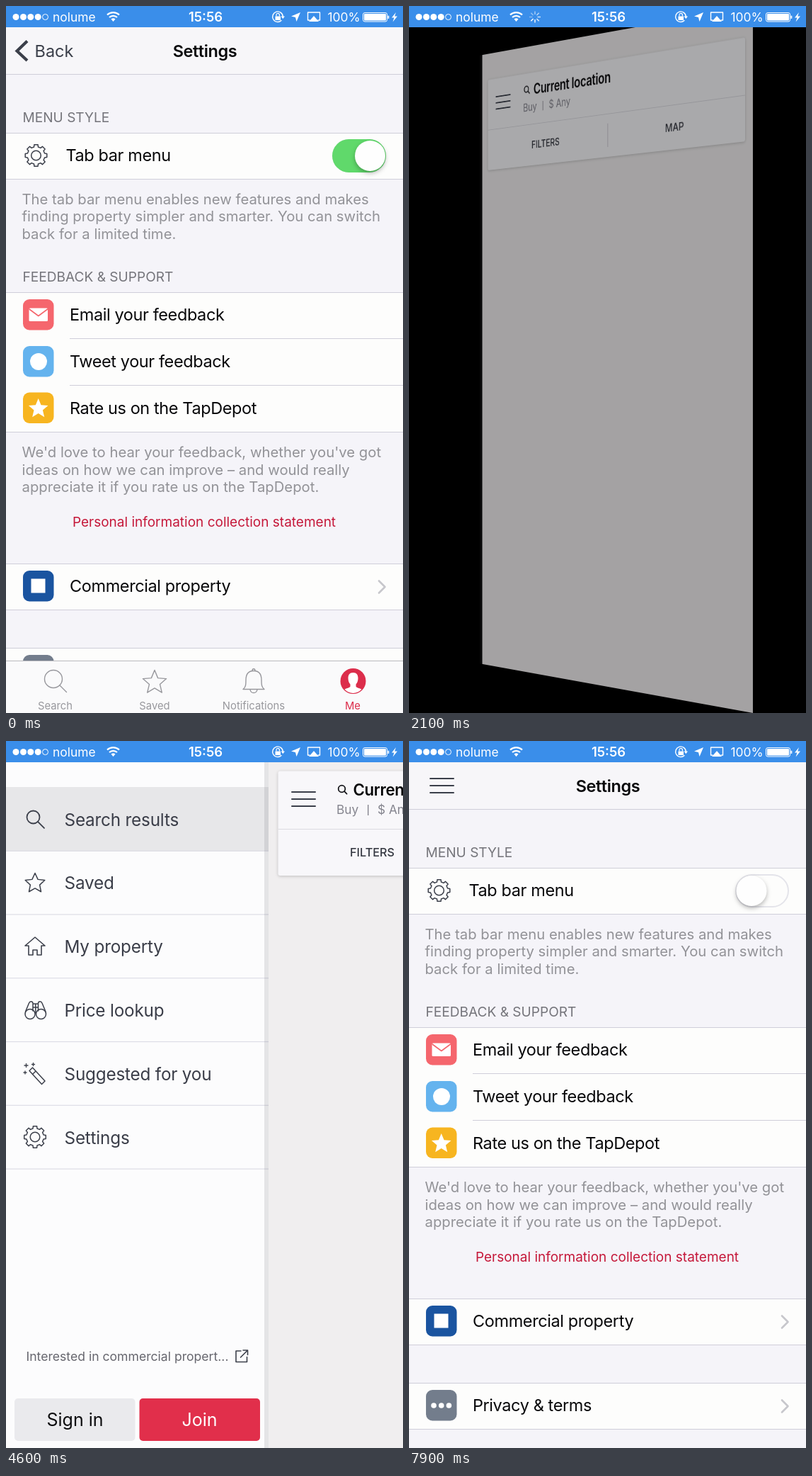
An HTML page for the animation above (8 s loop, 561x998 px).

```html
<!DOCTYPE html>
<html lang="en">
<head>
<meta charset="utf-8">
<title>Settings menu style</title>
<style>
html, body { margin: 0; width: 100%; height: 100%; overflow: hidden; background: #000; }
#stage { position: relative; width: 561px; height: 998px; overflow: hidden; background: #000;
  perspective: 2376px; perspective-origin: 280.5px 499px; }
.page, #status { position: absolute; left: 0; top: 0; width: 561px; height: 998px; }
#status { height: 30px; }
svg { display: block; overflow: visible; }
text { font-family: Inter, "Liberation Sans", sans-serif; white-space: pre; }
.title, .row { font-size: 23.5px; letter-spacing: -.4px; fill: #08080a; }
.title { font-weight: 600; text-anchor: middle; }
.back { font-size: 23.5px; fill: #3b3f4a; }
.head { font-size: 19.1px; fill: #75757b; }
.note { font-size: 20.3px; fill: #929297; }
.link { font-size: 19px; fill: #c5183a; text-anchor: middle; }
.tab { font-size: 14.8px; fill: #98989d; text-anchor: middle; }
.item { font-size: 24.3px; letter-spacing: -.2px; fill: #3a3d48; }
.place { font-size: 22.3px; letter-spacing: -.4px; font-weight: 600; fill: #08080a; }
.sub { font-size: 17.3px; fill: #85858f; }
.act { font-size: 16.2px; font-weight: 500; fill: #33363f; text-anchor: middle; }
.more { font-size: 17.6px; fill: #66666e; }
.btn { font-size: 25px; text-anchor: middle; }
.stat { font-size: 17.4px; fill: #fff; }
.time { font-size: 18.5px; font-weight: 600; fill: #fff; text-anchor: middle; }
.ln { fill: none; stroke-linejoin: round; stroke-linecap: round; }
.knob { filter: drop-shadow(0 3px 3px rgba(0,0,0,.28)); }
.card { filter: drop-shadow(0 1px 2px rgba(0,0,0,.2)); }
</style>
</head>
<body>
<div id="stage">
  <div class="page" id="menu"></div>
  <div class="page" id="tabbed"></div>
  <div class="page" id="search"></div>
  <div class="page" id="plain"></div>
  <div id="status"></div>
</div>
<script>
const W = 561, H = 998, LOOP = 8000, OPEN = 371;
const INK = '#3b3f4a', RED = '#dc2d4b', LINE = '#cfced9';
const $ = id => document.getElementById(id);

const text = (cls, x, y, s, extra = '') => `<text class="${cls}" x="${x}" y="${y}" ${extra}>${s}</text>`;
const rect = (x, y, w, h, fill, r = 0) => `<rect x="${x}" y="${y}" width="${w}" height="${h}" rx="${r}" fill="${fill}"/>`;
const disc = (x, y, r, fill) => `<circle cx="${x}" cy="${y}" r="${r}" fill="${fill}"/>`;
const ring = (x, y, r, c, w) => `<circle cx="${x}" cy="${y}" r="${r}" fill="none" stroke="${c}" stroke-width="${w}"/>`;
const line = (d, c = INK, w = 1.5) => `<path class="ln" d="${d}" stroke="${c}" stroke-width="${w}"/>`;
const rule = (y, x = 0, w = W - x) => rect(x, y, w, 1, LINE);
const svg = (body, h = H) => `<svg width="${W}" height="${h}" viewBox="0 0 ${W} ${h}">${body}</svg>`;

// Closed path through polar points [angle, radius]
const polar = (cx, cy, pts) => 'M' + pts.map(([a, r]) =>
  `${(cx + r * Math.sin(a)).toFixed(2)} ${(cy - r * Math.cos(a)).toFixed(2)}`).join('L') + 'Z';

const star = (x, y, r, ratio = .45) =>
  polar(x, y, Array.from({ length: 10 }, (_, i) => [i * Math.PI / 5, i % 2 ? r * ratio : r]));

function gear(x, y, r) {
  const pts = [];
  for (let i = 0; i < 8; i++) {
    const a = i * Math.PI / 4;
    pts.push([a - .24, r * .8], [a - .17, r], [a + .17, r], [a + .24, r * .8]);
  }
  return line(polar(x, y, pts), INK, 1.5) + ring(x, y, r * .44, INK, 1.5);
}

const burger = (x, y) => [0, 10, 20].map(d => line(`M${x + 1} ${y + d}h33`, INK, 2)).join('');
const glass = (x, y, r, c, w, len) =>
  ring(x, y, r, c, w) + line(`M${x + r * .72} ${y + r * .72}l${len} ${len}`, c, w);
const house = (x, y, c, w) =>
  line(`M${x - 9} ${y - 1}h-5l14 -12l14 12h-5v13h-6v-7h-6v7h-6z`, c, w);
const chevron = y => line(`M527 ${y - 8.5}l8.5 8.5l-8.5 8.5`, '#c7c7cc', 2.6);

function toggle(on) {
  return `<rect x="462" y="189" width="74" height="45" rx="22.5" fill="#fdfdfc" stroke="#e4e4ea" stroke-width="2"/>` +
    (on ? `<rect class="fill" x="461" y="188" width="76" height="47" rx="23.5" fill="#60d96b"/>` : '') +
    `<circle class="knob" cx="${on ? 514.5 : 484}" cy="211.5" r="21.5" fill="#fefefe"/>`;
}

function tabBar() {
  const g = '#98989d';
  return rect(0, 924, W, 74, '#fafafb') + rect(0, 924, W, 1, '#b9b9be') +
    glass(67, 950, 12.5, g, 1.4, 9.5) + text('tab', 69.5, 993, 'Search') +
    line(star(210, 955, 17.5), g, 1.4) + text('tab', 210, 993, 'Saved') +
    line('M335 964.500c4 -3 4 -7 4 -13c0 -9 4 -13 11 -13s11 4 11 13c0 6 0 10 4 13zM348 938c0 -3 4 -3 4 0M345 965c1 6 9 6 10 0', g, 1.4) +
    text('tab', 350, 993, 'Notifications') +
    disc(490.5, 953, 18, RED) +
    '<path fill="#fff" d="M490.500 941c5 0 7 3 7 8c0 4 -1.500 7 -3 8.500v3c1 2 5 2.500 8 4a16 16 0 0 1 -24 0c3 -1.500 7 -2 8 -4v-3c-1.500 -1.500 -3 -4.500 -3 -8.500c0 -5 2 -8 7 -8z"/>' +
    text('tab', 490, 993, 'Me', `style="fill:${RED}"`);
}

function settings(tabs) {
  const white = '#fdfdfc';
  const tile = (y, c) => rect(24, y, 43.5, 43.5, c, 9);
  return rect(0, 0, W, H, '#f5f4f9') + rect(0, 30, W, 66, '#f7f6f9') + rule(96) +
    (tabs ? line('M30 49.500L15.500 63.500L30 77', INK, 4.2).replace('class="ln"', 'fill="none"') + text('back', 40.5, 71.5, 'Back')
          : burger(29, 53)) +
    text('title', 281, 71.5, 'Settings') +
    text('head', 23.5, 164, 'MENU STYLE') +
    rect(0, 179, W, 66, white) + rule(179) + rule(244) +
    gear(42.5, 211, 15.5) + text('row', 84.5, 219, 'Tab bar menu') + toggle(tabs) +
    ['The tab bar menu enables new features and makes',
     'finding property simpler and smarter. You can switch',
     'back for a limited time.'].map((s, i) => text('note', 22.5, 279.5 + i * 24.8, s)).join('') +
    text('head', 23.5, 389, 'FEEDBACK &amp; SUPPORT') +
    rect(0, 404, W, 197, white) + rule(404) + rule(469, 90) + rule(535, 90) + rule(601) +
    tile(414, '#f5666d') + rect(32.5, 426.5, 26.5, 18.5, '#fff', 1.5) + line('M33 428l12.800 9.500l12.800 -9.500', '#f5666d', 1.6) +
    tile(480, '#64b3ee') + disc(46, 502, 12, '#fff') +
    tile(545.5, '#f7b520') + `<path d="${star(45.7, 568.5, 14.5)}" fill="#fff"/>` +
    ['Email your feedback', 'Tweet your feedback', 'Rate us on the TapDepot']
      .map((s, i) => text('row', 90, 444 + i * 66, s)).join('') +
    ["We'd love to hear your feedback, whether you've got",
     'ideas on how we can improve – and would really',
     'appreciate it if you rate us on the TapDepot.'].map((s, i) => text('note', 22.5, 637 + i * 24.7, s)).join('') +
    text('link', 280, 734.5, 'Personal information collection statement') +
    rect(0, 787, W, 65, white) + rule(787) + rule(852) +
    tile(797, '#1a54a0') + rect(35.5, 808.5, 20, 20, '#fff') +
    text('row', 90, 827, 'Commercial property') + chevron(820) +
    rect(0, 906, W, 65, white) + rule(906) + rule(971) +
    tile(916, '#737d8c') + [35, 45.7, 56.4].map(x => disc(x, 938, 3.8, '#fff')).join('') +
    text('row', 90, 946, 'Privacy &amp; terms') + chevron(939) +
    (tabs ? tabBar() : '');
}

function searchPage() {
  return rect(0, 0, W, H, '#f0eeef') +
    `<g class="card">${rect(13.5, 42.5, 533.5, 147.5, '#f8f7fa', 3)}</g>` +
    burger(32, 72) + glass(103.5, 67.5, 4.8, '#17181c', 1.8, 3.6) +
    text('place', 119.5, 77, 'Current location') +
    text('sub', 96, 103, 'Buy') + rect(140, 90, 1.4, 15, '#85858f') + text('sub', 154, 103, '$ Any') +
    rect(13.5, 124, 533.5, 1, '#dcdbe1') + rect(280.5, 139, 1, 36, '#c2c1c8') +
    text('act', 146.5, 163, 'FILTERS') + text('act', 415, 163, 'MAP');
}

function menuPage() {
  const names = ['Search results', 'Saved', 'My property', 'Price lookup', 'Suggested for you', 'Settings'];
  return rect(0, 0, W, H, '#fcfcfd') +
    '<rect id="mark" x="0" y="65" width="371" height="91" fill="#e7e7e9"/>' +
    names.map((s, i) => rect(0, 154.5 + i * 89.8, OPEN, 1.2, '#dddde6') + text('item', 82.5, 119.5 + i * 89.8, s)).join('') +
    glass(38.5, 107.5, 9, INK, 1.8, 9) +
    line(star(41, 201, 14.5, .48)) +
    house(41, 290, INK, 1.6) +
    ring(34, 385.5, 7, INK, 1.5) + ring(49.5, 385.5, 7, INK, 1.5) +
    line('M27.500 382l5 -12c1 -3 5 -3 5.500 0v11M56 382l-5 -12c-1 -3 -5 -3 -5.500 0v11M38 371h7.500M38 376h7.500M41.800 371v13') +
    line('M33 465.500l4.500 -4.500l17.500 19l-4.500 4.500zM37.500 470.500l4.500 -4.500') +
    line('M28.500 455.500v5m-2.500 -2.500h5M38.500 454.500v4m-2 -2h4M27 466v4m-2 -2h4', INK, 1.3) +
    gear(41, 559, 15.5) +
    text('more', 28.5, 875, 'Interested in commercial propert...') +
    line('M332 861h-7v15.500h15.500v-7M335 860h6.500v6.500M341 860.500l-9.500 9.500', INK, 1.6) +
    rect(12, 928, 170.5, 60, '#eaeaed', 5) + text('btn', 97.5, 967, 'Sign in', 'fill="#0c0c0e"') +
    rect(188.5, 928, 170.5, 60, '#e12f4b', 5) + text('btn', 273.5, 967, 'Join', 'fill="#fff"');
}

function statusBar() {
  const w = '#fff';
  const spokes = Array.from({ length: 8 }, (_, i) =>
    `<path class="spoke" d="M0 -3.500V-8" stroke="#fff" stroke-width="1.500" transform="translate(178 15.500) rotate(${i * 45})"/>`).join('');
  return rect(0, 0, W, 30, '#3a8eea') +
    [14, 24.5, 34.8, 45.2].map(x => disc(x, 15.5, 4.5, w)).join('') + ring(55.5, 15.5, 4, w, 1) +
    text('stat', 66, 21.8, 'nolume') +
    '<path d="M151.500 22l-3 -3.500a4.500 4.500 0 0 1 6 0z" fill="#fff"/>' +
    '<path d="M146 16a8 8 0 0 1 11 0M143 12.500a12.500 12.500 0 0 1 17 0" fill="none" stroke="#fff" stroke-width="2.300"/>' +
    `<g id="spin">${spokes}</g>` +
    text('time', 282, 22, '15:56') +
    line('M389 20.500a7.300 7.300 0 1 1 2.300 -5.500', w, 1.4) + '<path d="M388.500 14.500h5.500l-2.700 3.500z" fill="#fff"/>' +
    rect(380.5, 14.500, 7.5, 5.5, w) + line('M382 14v-1.500a2.200 2.200 0 0 1 4.400 0v1.500', w, 1.2) +
    '<path d="M416 9L410.500 22L409 16L403 14.500Z" fill="#fff"/>' +
    line('M429 20h-2.500v-11h17v11h-2.500', w, 1.4) + '<path d="M435 14l7 8h-14z" fill="#fff"/>' +
    text('stat', 454.5, 21.8, '100%') +
    `<rect x="504.500" y="9.500" width="34" height="12.500" rx="2.500" fill="none" stroke="#fff"/>` +
    rect(506, 11, 31, 9.5, w, 1) + rect(539.5, 13.5, 1.8, 4.5, w, 1) +
    '<path d="M551 9l-6 7.500h3.500l-2 6l6.500 -8h-3.800z" fill="#fff"/>';
}

const edge = `<rect x="-6" y="0" width="6" height="${H}" fill="#50505f" opacity=".14"/>`;
$('menu').innerHTML = svg(menuPage());
$('tabbed').innerHTML = svg(settings(true));
$('search').innerHTML = svg(edge + searchPage());
$('plain').innerHTML = svg(edge + settings(false));
$('status').innerHTML = svg(statusBar(), 30);

const knob = document.querySelector('#tabbed .knob');
const fill = document.querySelector('#tabbed .fill');
const spokes = document.querySelectorAll('.spoke');

const ease = (t, start, dur) => {
  const p = Math.min(1, Math.max(0, (t - start) / dur));
  return p * p * (3 - 2 * p);
};
const show = (id, on) => { $(id).style.visibility = on ? 'visible' : 'hidden'; };

// Card flip where the nearer edge stays on the screen plane
function flip(id, deg) {
  const s = Math.abs(Math.sin(deg * Math.PI / 180)), st = $(id).style;
  st.transform = s < 1e-6 ? 'none' : `translateZ(${-W / 2 * s}px) rotateY(${deg}deg)`;
  st.filter = s < 1e-6 ? 'none' : `brightness(${1 - .466 * s})`;
}

function render(t) {
  const off = ease(t, 1540, 260);
  knob.setAttribute('cx', 514.5 - 30.5 * off);
  fill.setAttribute('opacity', 1 - off);

  const turn = 180 * ease(t, 1828, 400);
  const chosen = t >= 6000;
  show('tabbed', turn < 90);
  show('search', turn >= 90 && !chosen);
  show('plain', chosen);
  show('menu', t > 3500);

  const x = OPEN * (ease(t, 3950, 320) - ease(t, 6186, 300));
  flip('tabbed', Math.min(turn, 90));
  if (turn < 180) flip('search', turn - 180);
  else {
    $('search').style.filter = 'none';
    $('search').style.transform = `translateX(${x}px)`;
  }
  $('plain').style.transform = `translateX(${x}px)`;
  $('mark').setAttribute('y', chosen ? 514 : 65);

  $('spin').style.display = t >= 1900 && t < 2850 ? '' : 'none';
  const step = Math.floor(t / 100);
  spokes.forEach((s, i) => s.setAttribute('opacity', 1 - .09 * ((step - i + 800) % 8)));
}

function frame() {
  render(performance.now() % LOOP);
  requestAnimationFrame(frame);
}
frame();
</script>
</body>
</html>
```
